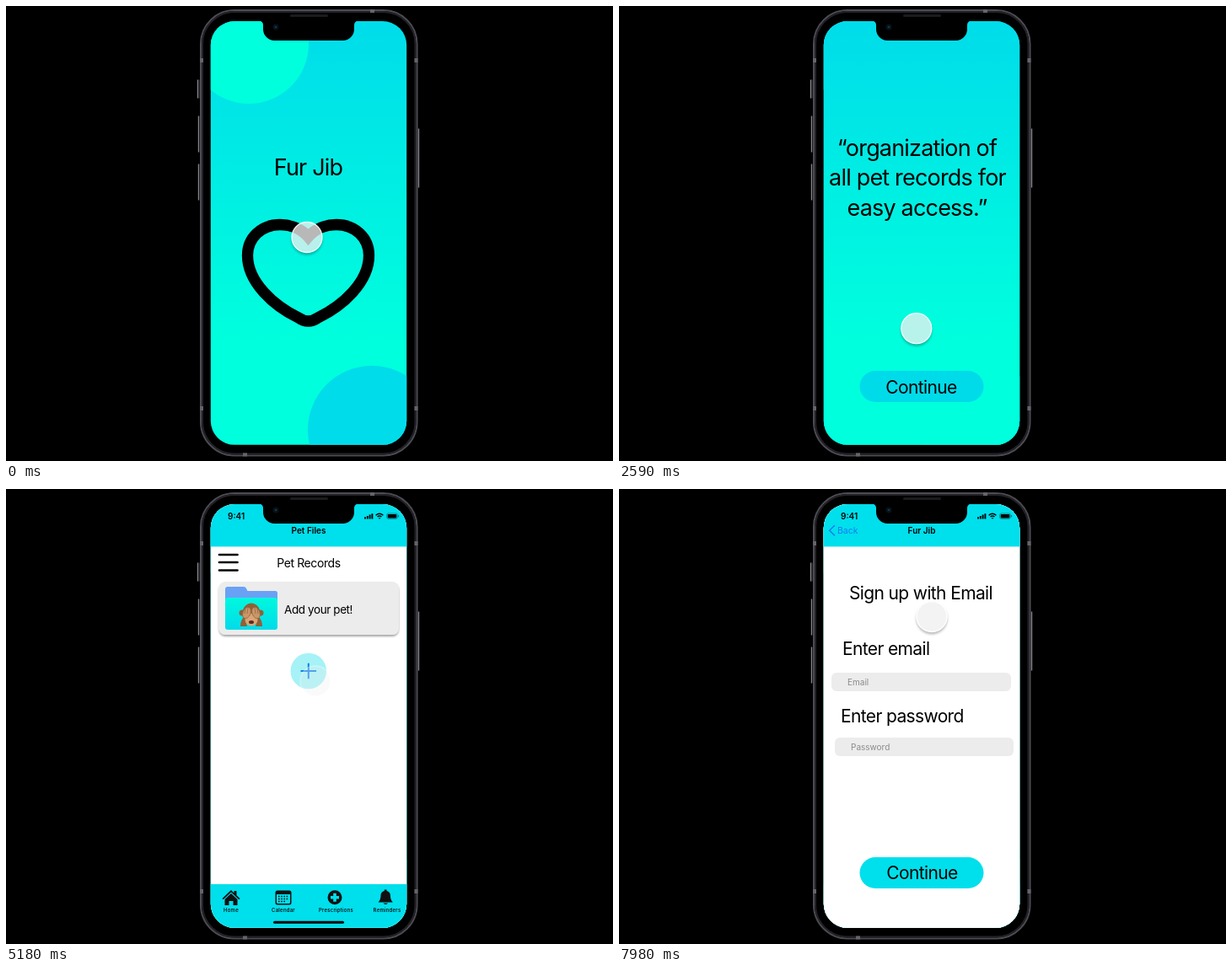
These frames come from a looping animation (720x540 px, 8000 ms). An HTML page:

```html
<!DOCTYPE html>
<html lang="en">
<head>
<meta charset="utf-8">
<title>Pet records prototype</title>
<style>
  html, body { margin: 0; height: 100%; background: #000; overflow: hidden; }
  svg { display: block; width: 100%; height: 100%; }
  text { font-family: Inter, Roboto, sans-serif; letter-spacing: -.03em; }
  .mid { text-anchor: middle; }
  .bold { font-weight: 600; font-size: 10px; letter-spacing: 0; }
  .row { font-weight: 600; font-size: 11px; letter-spacing: .035em; }
  .h1 { font-size: 27px; }
  .h2 { font-size: 21px; }
  .body { font-size: 14px; }
  .hint { font-size: 10px; letter-spacing: 0; fill: #8a8a8a; }
  .tab { font-size: 6px; font-weight: 500; letter-spacing: .25px; text-anchor: middle; }
  .link { font-size: 14.3px; }
</style>
</head>
<body>
<svg viewBox="0 0 720 540">
  <defs>
    <linearGradient id="sea" gradientUnits="userSpaceOnUse" x1="0" y1="18" x2="0" y2="400">
      <stop stop-color="#00dcea"/><stop offset="1" stop-color="#00ffdd"/>
    </linearGradient>
    <linearGradient id="pocket" x2="0" y2="1">
      <stop stop-color="#00f8de"/><stop offset="1" stop-color="#00dbea"/>
    </linearGradient>
    <clipPath id="glass"><rect x="242.800" y="18" width="232.400" height="502.800" rx="28.500"/></clipPath>
    <clipPath id="outside"><path clip-rule="evenodd" d="M-30-30h60v60h-60zM-18.500 0a18.500 18.500 0 1 0 37 0a18.500 18.500 0 1 0-37 0z"/></clipPath>
    <filter id="soft" x="-50%" y="-50%" width="200%" height="200%"><feGaussianBlur stdDeviation="1.5"/></filter>
    <filter id="drop" x="-10%" y="-10%" width="120%" height="130%">
      <feDropShadow dx="0" dy="2" stdDeviation="1" flood-opacity=".35"/>
    </filter>
    <rect id="page" x="242" y="17" width="234" height="505"/>
    <g id="status">
      <rect x="242" y="17" width="234" height="51.400" fill="#00dfec"/>
      <text class="bold" x="263" y="35.500">9:41</text>
      <path d="M426 35.500v-2.200m2.800 2.200v-3.400m2.800 3.400v-4.900m2.800 4.900v-6.300" stroke="#000" stroke-width="1.900"/>
      <path d="M438.600 31.200q4.400-3.800 8.800 0M440.500 33q2.500-2 5 0" fill="none" stroke="#000" stroke-width="1.400"/>
      <path d="M441.600 34.300h2.800l-1.400 1.400z"/>
      <rect x="451.700" y="29" width="12.600" height="6.400" rx="1.800" fill="none" stroke="#000" stroke-opacity=".5" stroke-width=".7"/>
      <rect x="452.700" y="30" width="10.600" height="4.400" rx="1"/>
      <path d="M465.600 31v2.400" stroke="#000" stroke-opacity=".5"/>
    </g>
    <g id="nav">
      <use href="#status"/>
      <text class="bold mid" x="359" y="52.500">Fur Jib</text>
      <path d="M255.500 43.500l-5.800 5.700 5.800 5.700" fill="none" stroke="#147df0" stroke-width="1.500" stroke-linecap="round"/>
      <text x="259" y="53" font-size="10.500" fill="#147df0" style="letter-spacing:0">Back</text>
    </g>
  </defs>

  <!-- phone body -->
  <path d="M227.500 87.500v22M228.500 130.500v43M228.500 187.500v43M489.500 145.500v70" stroke="#85848a" stroke-width="1.400"/>
  <path d="M229 87.500v22" stroke="#2c2b30" stroke-width="1.600"/>
  <rect x="231" y="5" width="256.500" height="528.500" rx="40" fill="#000" stroke="#4d4c53" stroke-width="2"/>
  <rect x="233" y="7" width="252.500" height="524.500" rx="38" fill="none" stroke="#232228" stroke-width="2"/>
  <path d="M230 62h4v5h-4zM484.500 62h4v5h-4zM230 475h4v5h-4zM484.500 475h4v5h-4zM432 4h5v4h-5zM281 530.500h5v4h-5z" fill="#65646a"/>
  <rect x="337" y="10" width="45" height="3" rx="1.500" fill="#1b1b1f"/>

  <g clip-path="url(#glass)">
    <g id="splash">
      <use href="#page" fill="url(#sea)"/>
      <circle cx="288" cy="45" r="71" fill="#00ffdd"/>
      <circle cx="434" cy="503" r="76" fill="#00dcea"/>
      <text class="h1 mid" x="358.500" y="200.500">Fur Jib</text>
      <path d="M358.500 274C350 264 337 259.500 325 259.500C303 259.500 286.500 275 286.500 296C286.500 328 318 356 347 370Q358.500 378 370 370C399 356 430.500 328 430.500 296C430.500 275 414 259.500 392 259.500C380 259.500 367 264 358.500 274Z"
        fill="none" stroke="#000" stroke-width="13.300"/>
    </g>

    <g id="quote">
      <use href="#page" fill="url(#sea)"/>
      <g class="h1 mid">
        <text x="353.500" y="177.500">“organization of</text>
        <text x="354" y="213">all pet records for</text>
        <text x="353.500" y="248.500">easy access.”</text>
      </g>
      <rect x="285.500" y="433" width="147" height="37" rx="18.500" fill="#00dbea"/>
      <text class="h2 mid" x="358.500" y="459.500">Continue</text>
    </g>

    <g id="records">
      <use href="#page" fill="#fff"/>
      <use href="#status"/>
      <text class="bold mid" x="359" y="52.500">Pet Files</text>
      <path d="M253 78h21.500M253 87h21.500M253 96.500h21.500" stroke="#000" stroke-width="2.700" stroke-linecap="round"/>
      <text class="body mid" x="359" y="92.500">Pet Records</text>
      <rect x="252.500" y="110" width="213.500" height="63" rx="8" fill="#ececec" filter="url(#drop)"/>
      <path d="M260 132v-13q0-3 3-3h19q2 0 3 2l1.500 3h33q2.500 0 2.500 2.500v8.500z" fill="#69a1f5"/>
      <rect x="260" y="129" width="62" height="38" rx="3" fill="url(#pocket)"/>
      <g fill="#8f6038">
        <circle cx="280" cy="147" r="3.500"/><circle cx="302" cy="147" r="3.500"/>
        <ellipse cx="291" cy="147.500" rx="10.500" ry="12"/>
        <path d="M278 163q0-8 5-12l3 12zM304 163q0-8-5-12l-3 12z"/>
      </g>
      <ellipse cx="291" cy="155" rx="7.500" ry="7.500" fill="#d9a574"/>
      <g fill="#c9966a" stroke="#8f6038" stroke-width=".7">
        <ellipse cx="285.500" cy="147" rx="4.500" ry="7" transform="rotate(22 285.500 147)"/>
        <ellipse cx="296.500" cy="147" rx="4.500" ry="7" transform="rotate(-22 296.500 147)"/>
        <path d="M284 142l-1 6m4-7-1 7M298 142l1 6m-4-7 1 7" fill="none"/>
      </g>
      <ellipse cx="291" cy="158" rx="3" ry="2" fill="#60281c"/>
      <text x="330" y="148" font-size="13.500">Add your pet!</text>
      <circle cx="358.800" cy="216" r="21.300" fill="#a6f2f6"/>
      <path d="M349.500 216h18.600M358.800 206.700v18.600" stroke="#1080e8" stroke-width="2"/>

      <rect x="242" y="469" width="234" height="53" fill="#00dfec"/>
      <g fill="#111">
        <path d="M256.500 486l10.500-10 3.500 3.400V477h3v5.200l4 3.800-1.200 1.200-9.300-8.700-9.300 8.700z"/>
        <path d="M259.500 487l7.500-7 7.500 7v7h-5v-5h-5v5h-5z"/>
        <path d="M322 476.500h14q2.500 0 2.500 2.500v12q0 2.500-2.500 2.500h-14q-2.500 0-2.500-2.500v-12q0-2.500 2.500-2.500zM321 481v9.500q0 1.500 1.500 1.500h13q1.500 0 1.500-1.500V481z" fill-rule="evenodd"/>
        <circle cx="390" cy="484.700" r="8.500"/>
        <path d="M441.500 490.500q3-3 3-8 0-4.500 4.300-5.500v-1.500h2.800v1.500q4.300 1 4.300 5.500 0 5 3 8zM447.500 491.500h5.500q-2.700 3-5.500 0z"/>
      </g>
      <path d="M323 483.500h12M323 486.500h12M323 489.500h9" stroke="#111" stroke-width="1.600" stroke-dasharray="1.600 1.600"/>
      <path d="M385 484.700h10M390 479.700v10" stroke="#00dfec" stroke-width="3.600"/>
      <text class="tab" x="267" y="501.500">Home</text>
      <text class="tab" x="329" y="501.500">Calendar</text>
      <text class="tab" x="391.500" y="501.500">Prescriptions</text>
      <text class="tab" x="452" y="501.500">Reminders</text>
      <rect x="317" y="512.700" width="84" height="3" rx="1.500"/>
    </g>

    <g id="signup">
      <use href="#page" fill="#fff"/>
      <use href="#nav"/>
      <g fill="#dadada" filter="url(#drop)">
        <rect x="259" y="111" width="199.500" height="52.500" rx="17"/>
        <rect x="259" y="183" width="199.500" height="52.500" rx="17"/>
        <rect x="259" y="255" width="199.500" height="52" rx="17"/>
        <rect x="259" y="326.700" width="199.500" height="52.500" rx="17"/>
      </g>
      <rect x="278.500" y="127" width="25.500" height="20" fill="#00d9ea"/>
      <path d="M279 127.500l12.200 11 12.300-11M279 146.500l9.300-10M303.500 146.500l-9.300-10" fill="none" stroke="#e6f7f8"/>
      <circle cx="291" cy="209" r="14" fill="#0f85f5"/>
      <circle cx="291" cy="280.500" r="11.500"/>
      <circle cx="291" cy="352.500" r="11.500" fill="#4285f4"/>
      <g class="row">
        <text x="329" y="141.500">Sign up with email</text>
        <text x="322" y="213.500">Sign up with Chatmoor</text>
        <text x="322" y="284">Sign up with Zelmu</text>
        <text x="322" y="356">Sign up with Fendlo</text>
      </g>
      <text class="link mid" x="359.500" y="460">Already have an account?</text>
      <text class="link mid" x="359" y="478">Log in.</text>
      <path d="M278 462.500h163M338 480.500h42" stroke="#000"/>
    </g>

    <g id="email">
      <use href="#page" fill="#fff"/>
      <use href="#nav"/>
      <g class="h2">
        <text class="mid" x="358" y="130.500">Sign up with Email</text>
        <text x="265" y="197">Enter email</text>
        <text x="263" y="277">Enter password</text>
      </g>
      <rect x="252" y="218" width="213" height="22" rx="6" fill="#ececec"/>
      <rect x="256" y="295" width="212" height="22" rx="6" fill="#ececec"/>
      <text class="hint" x="271" y="233">Email</text>
      <text class="hint" x="275" y="309.700">Password</text>
      <rect x="285.500" y="437" width="147" height="37" rx="18.500" fill="#00dfec"/>
      <text class="h2 mid" x="359.500" y="463">Continue</text>
    </g>
  </g>

  <!-- notch -->
  <path d="M300 17.500a5 5 0 0 1 5 5v5a13.500 13.500 0 0 0 13.500 13.500h81a13.500 13.500 0 0 0 13.500-13.500v-5a5 5 0 0 1 5-5z"/>
  <circle cx="320" cy="25" r="3.500" fill="#07121a"/>
  <circle cx="320" cy="25" r="1.300" fill="#0d3a4a"/>

  <g id="cursor">
    <g id="shade" clip-path="url(#outside)"><circle r="18.500" cy="2.500" opacity=".28" filter="url(#soft)"/></g>
    <g id="disc">
      <circle r="18" fill="#f0f0f0" fill-opacity=".77"/>
      <circle r="18" fill="none" stroke="#fff" stroke-opacity=".9" stroke-width="1.300"/>
    </g>
  </g>
</svg>
<script>
const LOOP = 8000;
const byId = id => document.getElementById(id);

// Each screen fades in over the previous one: [id, start, end]
const fades = [
  ['quote', 560, 900],
  ['records', 3390, 3570],
  ['signup', 5310, 5400],
  ['email', 7140, 7480],
];

// Cursor stops: [time, x, y]
const stops = [
  [0, 357, 274.5], [1270, 357, 274.5], [1470, 357.3, 285.5], [2320, 357.3, 285.5],
  [2800, 349.7, 448.5], [3360, 349.7, 448.5], [3570, 354, 448.5], [4340, 354, 448.5],
  [4970, 367, 228], [5320, 367, 228], [5390, 367.5, 225], [6230, 367.5, 225],
  [6930, 371, 151.5], [LOOP, 371, 151.5],
];

// The disc lies flat while pressed: [start, end, opacity]
const presses = [[560, 700, 1], [3290, 3430, 1], [5180, 5320, .4], [7140, 7280, 1]];

const progress = (t, from, to) => Math.min(1, Math.max(0, (t - from) / (to - from)));
const easeOut = p => 1 - (1 - p) ** 2;
const easeInOut = p => p * p * (3 - 2 * p);

function cursorAt(t) {
  const i = stops.findIndex(stop => stop[0] > t);
  const [t0, x0, y0] = stops[i - 1], [t1, x1, y1] = stops[i];
  const p = easeInOut(progress(t, t0, t1));
  return [x0 + (x1 - x0) * p, y0 + (y1 - y0) * p];
}

function draw() {
  const t = performance.now() % LOOP;
  for (const [id, from, to] of fades) {
    const opacity = easeOut(progress(t, from, to));
    byId(id).style.opacity = opacity;
    byId(id).style.display = opacity ? '' : 'none';
  }
  byId('cursor').setAttribute('transform', `translate(${cursorAt(t)})`);
  const press = presses.find(([from, to]) => t >= from && t < to);
  byId('shade').style.display = press ? 'none' : '';
  byId('disc').style.opacity = press ? press[2] : 1;
  requestAnimationFrame(draw);
}
draw();
</script>
</body>
</html>
```
